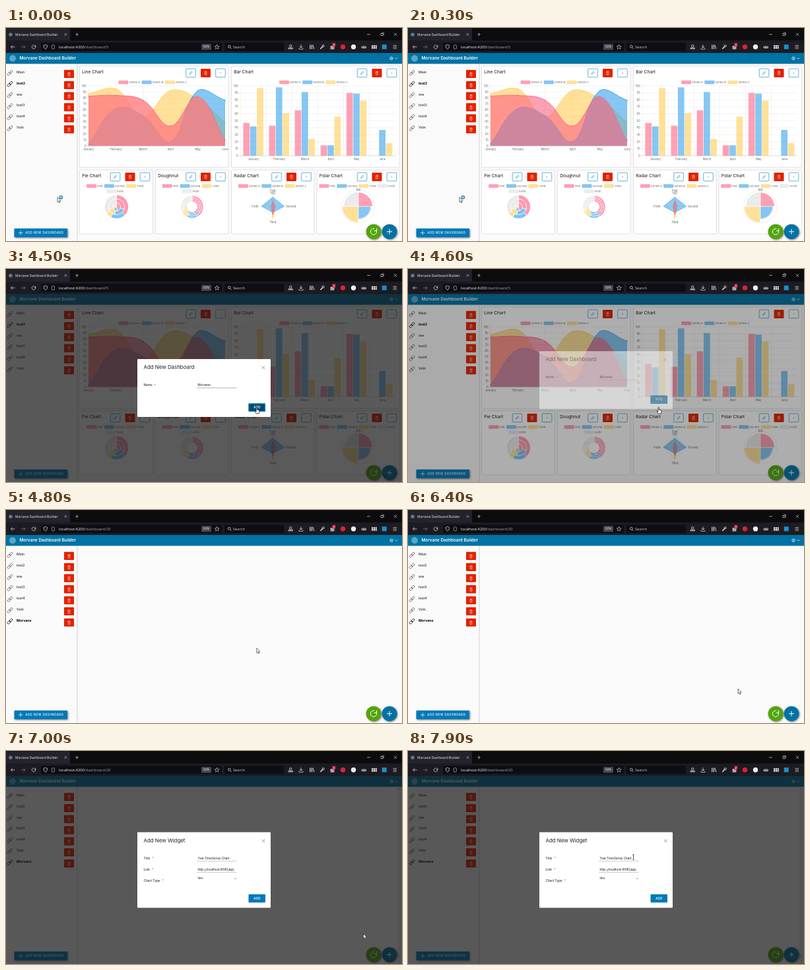
These frames come from a looping animation (600 px wide and 324 px high, 8000 ms). An HTML page with a canvas:

```html
<!DOCTYPE html>
<html lang="en">
<head>
<meta charset="utf-8">
<title>Dashboard</title>
<style>
html, body { margin: 0; width: 100%; height: 100%; overflow: hidden; background: #fafafa; }
canvas { display: block; width: 600px; height: 324px; }
</style>
</head>
<body>
<canvas id="stage"></canvas>
<script>
const LOOP = 8000;
const APP = 'Morvane Dashboard Builder';
const UI = 'Inter, "Open Sans", sans-serif';
const CHROME = '"Open Sans", "Noto Sans", sans-serif';
const RGB = ['255,99,132', '54,162,235', '255,206,86', '222,223,226'];
const SERIES = ['Series-A', 'Series-B', 'Series-C'];
const PARTS = ['First', 'Second', 'Third', 'Forth'];
const MONTHS = ['January', 'February', 'March', 'April', 'May', 'June'];
const LINES = [[83, 84, 76, 33, 82, 9], [3, 62, 50, 7, 92, 76], [87, 95, 48, 92, 78, 39]];
const BARS = [[47, 43, 65, 15, 90, 0], [42, 98, 91, 15, 89, 37], [97, 61, 24, 56, 79, 18]];
const BLUE = '#0079b8', RED = '#e12200';
const TAU = Math.PI * 2;

const canvas = document.getElementById('stage');
const c = canvas.getContext('2d');
const dpr = window.devicePixelRatio || 1;
canvas.width = 600 * dpr;
canvas.height = 324 * dpr;

const tint = (i, a = 0.6) => `rgba(${RGB[i]},${a})`;
const clamp = v => Math.max(0, Math.min(1, v));

function rect(x, y, w, h, fill, r = 0) {
  c.beginPath();
  c.roundRect(x, y, w, h, r);
  c.fillStyle = fill;
  c.fill();
}
function frame(x, y, w, h, color, lw = 0.7, r = 1) {
  c.beginPath();
  c.roundRect(x, y, w, h, r);
  c.strokeStyle = color;
  c.lineWidth = lw;
  c.stroke();
}
function disc(x, y, r, fill) {
  c.beginPath();
  c.arc(x, y, r, 0, TAU);
  c.fillStyle = fill;
  c.fill();
}
function ring(x, y, r, color, lw = 0.5) {
  c.beginPath();
  c.arc(x, y, r, 0, TAU);
  c.strokeStyle = color;
  c.lineWidth = lw;
  c.stroke();
}
function path(pts, color, lw = 0.7, fill) {
  c.beginPath();
  for (let i = 0; i < pts.length; i += 2) c.lineTo(pts[i], pts[i + 1]);
  if (fill) { c.closePath(); c.fillStyle = fill; c.fill(); }
  if (color) { c.strokeStyle = color; c.lineWidth = lw; c.stroke(); }
}
// y is the middle of the capital letters
function text(s, x, y, size, color, o = {}) {
  c.font = `${o.weight || 400} ${size}px ${o.font || UI}`;
  c.textAlign = o.align || 'left';
  c.letterSpacing = (o.space || 0) + 'px';
  c.fillStyle = color;
  c.fillText(s, x, y + size * 0.36);
  const w = c.measureText(s).width;
  c.letterSpacing = '0px';
  return w;
}
function cross(x, y, r, color, lw = 0.7) {
  path([x - r, y - r, x + r, y + r], color, lw);
  path([x - r, y + r, x + r, y - r], color, lw);
}
function plus(x, y, r, color, lw = 0.8) {
  path([x - r, y, x + r, y], color, lw);
  path([x, y - r, x, y + r], color, lw);
}
function shadowed(draw) {
  c.save();
  c.shadowColor = 'rgba(0,0,0,.55)';
  c.shadowBlur = 3 * dpr;
  c.shadowOffsetX = c.shadowOffsetY = dpr;
  draw();
  c.restore();
}
function refresh(x, y, r, color, lw) {
  c.beginPath();
  c.arc(x, y, r, -0.6, TAU - 1.3);
  c.strokeStyle = color;
  c.lineWidth = lw;
  c.stroke();
  path([x + r, y - r * 1.1, x + r, y - r * 0.25, x + r * 0.15, y - r * 0.25], color, lw);
}

function browser(id) {
  rect(0, 0, 600, 19, '#0c0c0f');
  rect(0, 0.5, 97, 18.5, '#24232c');
  rect(0, 19, 600, 19, '#1c1b22');
  disc(7, 10, 2.8, '#5f7c8c');
  text(APP, 14, 9.8, 4.9, '#f2f2f5', { font: CHROME });
  cross(90.5, 9.8, 1.7, '#e0e0e4', 0.6);
  plus(107.5, 9.8, 2.5, '#e0e0e4', 0.6);
  path([547, 9.7, 552, 9.7], '#eee', 0.6);
  frame(568, 8.4, 3.2, 3.2, '#eee', 0.6, 0);
  path([569.3, 8.2, 569.3, 7.2, 572.4, 7.2, 572.4, 10.4, 571.4, 10.4], '#eee', 0.5);
  cross(590, 9.7, 2.2, '#eee', 0.6);

  const ink = '#e6e6ea';
  path([13.5, 28.8, 7.5, 28.8], ink);
  path([10, 26.2, 7.4, 28.8, 10, 31.4], ink);
  path([23, 28.8, 29, 28.8], '#85848c');
  path([26.5, 26.2, 29.1, 28.8, 26.5, 31.4], '#85848c');
  refresh(42, 28.8, 2.8, ink, 0.7);
  rect(53, 22.5, 274, 12.5, '#0e0d13', 1.5);
  rect(331, 22.5, 90, 12.5, '#0e0d13', 1.5);
  path([57, 26.4, 59.8, 25.4, 62.6, 26.4, 62, 30, 59.8, 32.3, 57.6, 30, 57, 26.4], ink, 0.7);
  frame(69.4, 25.8, 4, 6, '#b5b5bc', 0.7);
  const w = text('localhost:4200', 80, 29, 5.75, '#f5f5f8', { font: CHROME });
  text('/dashboard/' + id, 80 + w, 29, 5.75, '#a5a4ac', { font: CHROME });
  rect(296, 24.3, 15, 9, '#484751', 1);
  text('60%', 303.5, 28.8, 4.6, '#eee', { font: CHROME, align: 'center' });
  const star = [];
  for (let i = 0; i <= 10; i++) {
    const r = i % 2 ? 1.6 : 3.7, a = i * TAU / 10 - TAU / 4;
    star.push(319.7 + r * Math.cos(a), 29 + r * Math.sin(a));
  }
  path(star, ink, 0.6);
  ring(338.3, 28.2, 1.9, ink, 0.7);
  path([339.6, 29.6, 341.5, 31.6], ink);
  text('Search', 344, 29, 5.7, '#d0d0d6', { font: CHROME });

  ring(431.2, 27.4, 1.7, ink, 0.8);
  path([428, 31.7, 428, 30.2, 434.4, 30.2, 434.4, 31.7, 428, 31.7], ink, 0.8);
  path([447, 25.4, 447, 30], ink, 0.8);
  path([444.8, 28, 447, 30.2, 449.2, 28], ink, 0.8);
  path([444, 30.5, 444, 32.2, 450, 32.2, 450, 30.5], ink);
  for (const x of [460.5, 462.3, 464]) path([x, 25.6, x, 32], ink, 0.8);
  path([465, 25.8, 467, 32], ink, 0.8);
  path([476.3, 31.8, 480, 28], ink, 1.4);
  ring(480.6, 27.2, 1.5, ink, 0.9);
  rect(491.5, 27, 6, 5.5, '#a9a9b0', 1);
  rect(494.3, 22.7, 5, 5.5, '#d7264b', 1);
  text('2', 496.8, 25.5, 4, '#fff', { align: 'center' });
  disc(510.5, 28.8, 3.7, '#df2036');
  disc(526.5, 28.8, 3.7, '#f0f0f0');
  rect(538.5, 27.5, 7.5, 3.4, '#b9b9bf', 1.6);
  disc(540.7, 29.1, 0.8, '#1c1b22');
  disc(543.8, 29.1, 0.8, '#1c1b22');
  for (let i = 0; i < 6; i++) rect(554 + i % 3 * 2.8, 26.2 + (i > 2 ? 2.9 : 0), 2.2, 2.4, ink);
  rect(569.7, 25.2, 7, 7, '#1791d0');
  for (const y of [26.6, 28.8, 31]) path([586.5, y, 592, y], ink, 0.7);
}

function trash(x, y) {
  frame(x - 1.5, y - 1.2, 3, 4, '#ffd2c9', 0.6, 0.4);
  path([x - 2.2, y - 1.7, x + 2.2, y - 1.7], '#ffd2c9', 0.6);
  path([x - 0.8, y - 2.6, x + 0.8, y - 2.6], '#ffd2c9', 0.6);
  path([x, y, x, y + 1.8], '#ffd2c9', 0.5);
}
function linkIcon(x, y, color) {
  c.save();
  c.translate(x, y);
  c.rotate(-TAU / 8);
  frame(-4.8, -1.5, 5.4, 3, color, 0.75, 1.5);
  frame(-0.6, -1.5, 5.4, 3, color, 0.75, 1.5);
  c.restore();
}
function shell(names, active) {
  rect(0, 38, 600, 286, '#fafafa');
  names.forEach((name, i) => {
    const y = 67 + 16.85 * i, on = name === active;
    linkIcon(6, y + 1.3, on ? '#000' : '#555');
    text(name, 16, y, 5.2, on ? '#000' : '#333', { weight: on ? 700 : 500 });
    rect(88, y - 3.2, 15, 12.3, RED, 0.8);
    trash(95.5, y + 3.2);
  });
  rect(107.6, 55, 0.8, 269, '#c8c8c8');
  rect(0, 38, 600, 16.6, '#0072a3');
  disc(10, 46.3, 5, '#5aa6c6');
  text(APP, 20.5, 46, 6.35, '#fff', { weight: 600 });
  ring(584, 46.2, 2.2, '#cfe6f0', 1);
  disc(584, 46.2, 0.8, '#cfe6f0');
  path([589.4, 45.2, 591.4, 47.2, 593.4, 45.2], '#fff', 0.7);
  shadowed(() => rect(12.5, 305, 80.5, 13.3, BLUE, 1));
  plus(22.2, 311.6, 3.3, '#fff', 0.7);
  text('ADD NEW DASHBOARD', 29.3, 311.6, 4.4, '#fff', { weight: 500, space: 0.5 });
}
function roundButtons() {
  shadowed(() => disc(557, 309.8, 11.4, '#52a50b'));
  refresh(557, 309.8, 4.6, '#fff', 1);
  shadowed(() => disc(581, 309.8, 11.4, '#0072a3'));
  plus(581, 309.8, 4, '#fff', 1);
}

function card(x, y, right, bottom, title) {
  rect(x, y, right - x, bottom - y, '#fff', 1);
  frame(x, y, right - x, bottom - y, '#d4d4d4', 0.7);
  text(title, x + 3.7, y + 8.2, 6.6, '#333', { weight: 500 });
  const top = y + 4, mid = top + 6.4;
  for (const dx of [57, 12]) frame(right - dx - 7.3, top, 14.6, 12.8, '#3f9bcb', 0.8);
  rect(right - 42, top, 15, 13, RED, 1);
  trash(right - 34.5, mid);
  const px = right - 57;
  path([px - 2, mid + 2, px - 1.5, mid + 0.5, px + 1.2, mid - 2.2, px + 2.2, mid - 1.2, px - 0.5, mid + 1.5, px - 2, mid + 2], BLUE, 0.6);
  plus(right - 12, mid, 1, '#5fb0da', 0.6);
}
function legend(labels, mid, y, first = 0) {
  c.font = `400 4.1px ${UI}`;
  const box = 14, gap = 1.5, space = 3;
  const widths = labels.map(s => c.measureText(s).width);
  let x = mid - (widths.reduce((a, w) => a + w + box + gap + space, 0) - space) / 2;
  labels.forEach((s, i) => {
    rect(x, y - 2.3, box, 4.6, tint(first + i));
    frame(x, y - 2.3, box, 4.6, tint(first + i, 0.9), 0.5, 0);
    text(s, x + box + gap, y, 4.1, '#666');
    x += widths[i] + box + gap + space;
  });
}
function axes(x0, x1, y0, y1, xs) {
  for (let v = 0; v <= 100; v += 10) {
    const y = y1 - (y1 - y0) * v / 100;
    path([x0 - 2.5, y, x1, y], v ? '#e6e6e6' : '#bbb', 0.5);
    text(v, x0 - 3.3, y, 4.2, '#666', { align: 'right' });
  }
  xs.forEach(x => path([x, y0, x, y1 + 2.5], '#e6e6e6', 0.5));
}
// cubic spline through the points with tension 0.4
function spline(p) {
  const ctrl = p.map(([x, y], i) => {
    const a = p[i - 1] || p[i], b = p[i + 1] || p[i];
    const d0 = Math.hypot(x - a[0], y - a[1]), d1 = Math.hypot(b[0] - x, b[1] - y);
    const k0 = 0.4 * d0 / (d0 + d1), k1 = 0.4 * d1 / (d0 + d1);
    const dx = b[0] - a[0], dy = b[1] - a[1];
    const lim = v => Math.max(88, Math.min(179.3, v));
    return [x - k0 * dx, lim(y - k0 * dy), x + k1 * dx, lim(y + k1 * dy)];
  });
  c.beginPath();
  c.moveTo(...p[0]);
  for (let i = 1; i < p.length; i++)
    c.bezierCurveTo(ctrl[i - 1][2], ctrl[i - 1][3], ctrl[i][0], ctrl[i][1], ...p[i]);
}
function lineChart(warm) {
  card(111.5, 58, 337, 212, 'Line Chart');
  legend(SERIES, 222.5, 82.6);
  const xs = MONTHS.map((_, i) => 125 + i * 41.4);
  axes(125, 332, 88, 179.3, xs);
  for (let s = 2; s >= 0; s--) {
    const pts = LINES[s].map((v, i) => [xs[i], 179.3 - 0.913 * v]);
    spline(pts);
    c.lineTo(332, 179.3);
    c.lineTo(125, 179.3);
    c.fillStyle = tint(s);
    c.fill();
    if (s === 0 && warm) {
      c.fillStyle = `rgba(255,142,128,${0.5 * warm})`;
      c.fill();
    }
    spline(pts);
    c.strokeStyle = tint(s, 1);
    c.lineWidth = 0.9;
    c.stroke();
    pts.forEach(([x, y]) => disc(x, y, 0.8, tint(s, 1)));
  }
  MONTHS.forEach((m, i) => text(m, xs[i], 184.8, 4.2, '#666', { align: 'center' }));
}
function barChart() {
  card(341.5, 58, 596.5, 212, 'Bar Chart');
  legend(SERIES, 466, 82.6);
  axes(355, 590, 88, 194.3, MONTHS.map((_, i) => 355 + i * 39.1));
  MONTHS.forEach((m, i) => {
    const mid = 374.8 + i * 39.1;
    BARS.forEach((b, s) => {
      const h = b[i] * 1.063;
      rect(mid - 15.4 + s * 10.4, 194.3 - h, 9.7, h, tint(s));
    });
    text(m, mid, 199.5, 4.2, '#666', { align: 'center' });
  });
}
function donut(x, y, hole, outer, sets) {
  const step = (outer - hole) / sets.length;
  sets.forEach((set, k) => {
    const r1 = outer - k * step, r0 = r1 - step;
    let a = -TAU / 4;
    set.forEach((v, i) => {
      const b = a + v / 100 * TAU;
      c.beginPath();
      c.arc(x, y, r1, a, b);
      c.arc(x, y, Math.max(r0, 0), b, a, true);
      c.closePath();
      c.fillStyle = tint(i, 0.65);
      c.fill();
      c.strokeStyle = '#fff';
      c.lineWidth = 0.7;
      c.stroke();
      a = b;
    });
  });
}
function partChart(x, right, title, mid, hole, r, sets) {
  card(x, 216, right, 313, title);
  legend(PARTS.slice(0, 3), mid - 2, 240.3);
  legend(PARTS.slice(3), mid - 2, 248.4, 3);
  donut(mid, 272, hole, r, sets);
}
function radarChart() {
  card(341.5, 216, 467, 313, 'Radar Chart');
  legend(SERIES, 404, 240.3);
  const x = 404.3, y = 271.3;
  const diamond = (t, r, b, l) => [x, y - t, x + r, y, x, y + b, x - l, y, x, y - t];
  for (const r of [6, 12, 18]) path(diamond(r, r, r, r), '#ddd', 0.5);
  plus(x, y, 18, '#ddd', 0.5);
  [[8, 3, 13, 2], [14, 17, 9, 17], [10, 4, 18, 3]].map((v, s) => [v, s]).reverse().forEach(([v, s]) =>
    path(diamond(...v), tint(s, 1), 0.7, tint(s, 0.55)));
  const o = { align: 'center' };
  text('First', x, 247.3, 4.2, '#555', o);
  text('100', x, 251.5, 4.2, '#555', o);
  text('Third', x, 295, 4.2, '#555', o);
  text('Second', 424, 271.3, 4.2, '#555');
  text('Forth', 382.5, 271.3, 4.2, '#555', { align: 'right' });
}
function polarChart() {
  card(471, 216, 596.5, 313, 'Polar Chart');
  legend(PARTS, 532, 240.3);
  const x = 533.8, y = 271.5;
  for (const r of [5, 10, 15, 20, 25]) ring(x, y, r, '#dcdcdc');
  [21.5, 19, 24.5, 22].forEach((r, i) => {
    c.beginPath();
    c.moveTo(x, y);
    c.arc(x, y, r, (i - 1) * TAU / 4, i * TAU / 4);
    c.closePath();
    c.fillStyle = tint(i);
    c.fill();
    c.strokeStyle = '#fff';
    c.lineWidth = 0.6;
    c.stroke();
  });
  text('100', x, 246, 4.2, '#555', { align: 'center' });
}
function charts(warm) {
  lineChart(warm);
  barChart();
  partChart(111.5, 222.5, 'Pie Chart', 167.5, 0, 18, [[38, 20, 8, 34], [30, 24, 16, 30], [48, 16, 12, 24]]);
  partChart(226.5, 337, 'Doughnut', 282, 8, 17, [[42, 16, 10, 32], [34, 22, 14, 30], [46, 14, 18, 22]]);
  radarChart();
  polarChart();
}

// fields: [label, value, is a select]
function modal(top, h, title, fields, p, pressed) {
  rect(0, 38, 600, 286, `rgba(20,20,22,${0.7 * p})`);
  c.save();
  c.globalAlpha = p;
  c.translate(0, top - 24 * (1 - p));
  rect(199, 0, 202, h, '#fff', 1);
  text(title, 208.5, 12.3, 7.9, '#222');
  cross(390.2, 13, 2.4, '#777', 0.7);
  fields.forEach(([label, value, select], i) => {
    const y = 39.6 + i * 17;
    const w = text(label, 208.5, y, 4.75, '#333', { weight: 500 });
    text('*', 211.5 + w, y + 0.6, 4.5, '#b04030');
    text(value, 290.6, select ? y - 3.4 : y - 0.3, 4.6, '#111');
    if (select) path([346, y - 3.8, 347.3, y - 2.5, 348.6, y - 3.8], '#333', 0.7);
    else rect(289, y + 4, 60.5, 0.6, '#999');
  });
  rect(367.5, h - 20.5, 25.5, 12.5, pressed ? '#004a70' : BLUE, 1);
  if (pressed) frame(367.9, h - 20.1, 24.7, 11.7, '#0095d3', 1);
  text('ADD', 380.4, h - 14.2, 4.3, '#fff', { align: 'center', weight: 600, space: 0.4 });
  c.restore();
}

const TRACK = [
  [2600, 265, 202], [2800, 279, 196], [2900, 279, 196], [3100, 291, 184], [3300, 315, 177],
  [3500, 348, 186], [3800, 380, 204], [4200, 379.8, 210], [6000, 379.8, 210],
  [6400, 500, 272], [6700, 583, 306], [6900, 583, 306], [7100, 500, 250],
  [7400, 368, 170], [7700, 368, 170], [7900, 341.5, 161.5]
];
function pointerAt(t) {
  if (t < TRACK[0][0]) return [78, 257.5];
  const i = TRACK.findIndex(k => k[0] > t);
  if (i < 0) return TRACK[TRACK.length - 1].slice(1);
  const [t0, x0, y0] = TRACK[i - 1], [t1, x1, y1] = TRACK[i];
  const k = (t - t0) / (t1 - t0);
  return [x0 + (x1 - x0) * k, y0 + (y1 - y0) * k];
}
function pointer(t) {
  c.save();
  c.translate(...pointerAt(t));
  if (t >= 7800) {
    path([0, -3.6, 0, 3.6], '#111', 0.7);
    for (const y of [-3.8, 3.8]) path([-1.4, y, 1.4, y], '#111', 0.6);
  } else if (t >= 3900 && t < 4700) {
    path([-0.7, 0.6, 0, 0, 0.8, 0.6, 0.8, 4, 3.6, 4.8, 4.2, 6, 3.4, 10, -0.8, 10, -2.8, 6.5, -2, 6, -0.7, 7.2, -0.7, 0.6], '#111', 0.7, '#fff');
  } else {
    path([0, 0, 0, 7.4, 1.7, 5.9, 2.9, 8.4, 4, 7.9, 2.8, 5.4, 5, 5.2, 0, 0], '#111', 0.6, '#fff');
    if (t < 2600) {
      ring(5.3, 0, 2.1, '#1a7fc4', 1.5);
    }
  }
  c.restore();
}

function draw(t) {
  const fresh = t >= 4700;
  const names = ['Main', 'test2', 'ww', 'test3', 'test4', 'Veln'];
  if (fresh) names.push('Morvane');
  c.setTransform(dpr, 0, 0, dpr, 0, 0);
  c.clearRect(0, 0, 600, 324);
  c.lineJoin = 'round';
  browser(fresh ? 20 : 5);
  shell(names, fresh ? 'Morvane' : 'test2');
  if (!fresh) charts(clamp(1 - t / 300));

  const first = t < 2600 ? 0 : clamp(1 - (t - 4500) / 200);
  const second = clamp((t - 6780) / 200);
  if (second > 0) {
    rect(592.5, 55, 7.5, 269, '#ececec');
    path([594.6, 58.8, 596.2, 57.2, 597.8, 58.8], '#666', 0.7);
    path([594.6, 311.5, 596.2, 313.1, 597.8, 311.5], '#666', 0.7);
  }
  roundButtons();
  if (first > 0) modal(137, 88, 'Add New Dashboard', [['Name', 'Morvane']], first, t >= 3900);
  if (second > 0) modal(123.6, 115, 'Add New Widget', [
    ['Title', 'Test TimeSeries Chart'],
    ['Link', 'http://localhost:8080/api/'],
    ['Chart Type', 'line', true]
  ], second, false);
  pointer(t);
}

const start = performance.now();
let last = -1;
function tick() {
  const t = Math.floor((performance.now() - start) % LOOP / 100) * 100;
  if (t !== last) draw(last = t);
  requestAnimationFrame(tick);
}
tick();
</script>
</body>
</html>
```
